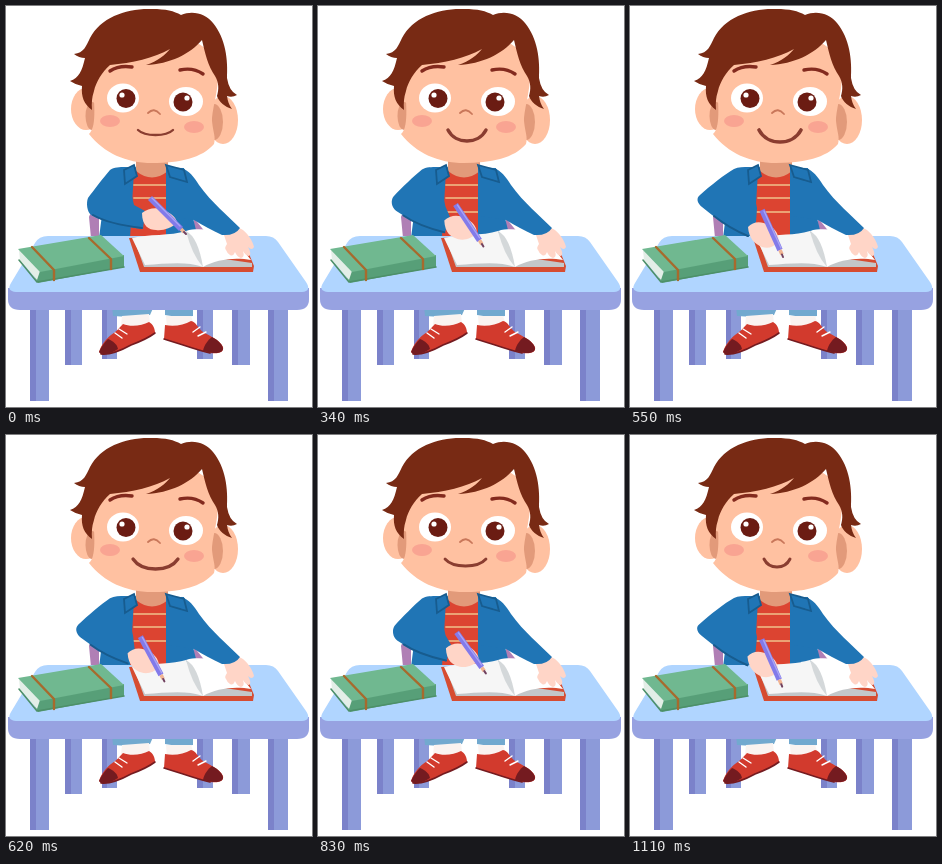
Animation, 306 px wide and 401 px high, one loop 1180 ms. Source, as an HTML page:

```html
<!DOCTYPE html>
<html lang="en">
<head>
<meta charset="utf-8">
<title>Boy writing at a desk</title>
<style>
html, body { margin: 0; width: 100%; height: 100%; overflow: hidden; background: #fff; }
svg { display: block; width: 306px; height: 401px; }
.line { fill: none; stroke-linecap: round; stroke-linejoin: round; }
.flat { fill: none; }
.skin { fill: #ffc1a1; }
.shade { fill: #e29a7a; }
.hand { fill: #ffd5c7; }
.hair { fill: #782a14; }
.blue { fill: #2075b5; }
.seam { stroke: #175c8f; }
.red { fill: #d23a2d; }
.sole { fill: #741b20; }
</style>
</head>
<body>
<svg viewBox="0 0 306 401">
  <!-- back legs of the desk -->
  <path fill="#8c9ad9" d="M59 303h17v56H59zM96 303h15v50H96zM191 303h16v50H191zM226 303h18v56H226z"/>
  <path fill="#7b82ca" d="M59 303h6v56h-6zM96 303h5v50h-5zM191 303h6v50h-6zM226 303h6v56h-6z"/>

  <!-- trousers and shoes -->
  <path fill="#72a9cf" d="M106 300H148L144 309Q128 312 107 310ZM159 300H187V310Q172 312 159 309Z"/>
  <path fill="#faf3f0" d="M116 310L143 308L144 318L128 322L115 319ZM160 310L185 310L188 319L161 322Z"/>
  <path class="red" d="M93 346C95 339 101 332 105 329C110 326 113 322 117 318C124 321 136 320 143 316C147 318 149 323 149 327C143 332 134 335 125 339C116 344 106 349 95 348Z"/>
  <path class="sole" d="M93 346C95 341 99 336 102 333C107 335 111 338 112 343C106 347 100 349 95 348Z"/>
  <path class="red" d="M159 319C168 321 178 319 185 315C190 316 192 322 197 326C204 330 214 334 217 341C218 346 214 348 204 347C190 344 172 337 158 333Z"/>
  <path class="sole" d="M206 331C212 334 217 339 217 343C216 348 208 348 197 345C198 339 202 334 206 331Z"/>
  <path class="line" stroke="#741b20" stroke-width="1.6" d="M95 348C106 349 116 344 125 339Q141 333 149 327M158 333C172 337 190 344 204 347"/>
  <path class="line" stroke="#fff" stroke-width="1.4" d="M109 327l7 5M113 323l8 5M187 326l7-5M192 330l8-4"/>

  <!-- front legs of the desk -->
  <path fill="#8c9ad9" d="M24 302h19v93H24zM262 302h20v93H262z"/>
  <path fill="#7b82ca" d="M24 302h6v93h-6zM262 302h6v93h-6z"/>

  <!-- chair and torso -->
  <path fill="#b07fb5" d="M83 211Q84 206 93 207V232H85ZM188 212L204 232H188Z"/>
  <path class="blue" d="M119 161L178 162L188 216L192 232H93L101 170Z"/>
  <path fill="#dc4431" d="M128 165H160V232H124Z"/>
  <path class="line" stroke="#eba274" stroke-width="1.8" d="M128 179H160M128 192H160M127 206H160"/>
  <path class="shade" d="M130 148H162V165Q146 178 130 165Z"/>

  <!-- desk top -->
  <path fill="#97a2e1" d="M2 282H303V293Q303 304 291 304H14Q2 304 2 293Z"/>
  <path fill="#b0d5ff" d="M42 230H260Q268 230 272 236L300 276Q306 285 296 286H10Q0 285 5 277L29 237Q33 230 42 230Z"/>

  <!-- closed book -->
  <path fill="#579f78" d="M13 244L33 265L118 249V261L32 277Z"/>
  <path fill="#e3eee7" d="M13 244L34 265L31 274L14 254Z"/>
  <path class="line" stroke="#4d9069" stroke-width="1.6" d="M13 254L31 276L118 261"/>
  <path fill="#70b890" d="M12 243L95 229L118 250L34 266Z"/>
  <path class="line" stroke="#a76a2d" stroke-width="2.4" d="M26 241L48 264V274M83 232L105 253V263"/>

  <!-- open book -->
  <path fill="#d64c31" d="M123 232L234 226L248 260L247 266H134Z"/>
  <path fill="#c3c7c9" d="M128 233L197 250L246 257V261H138Z"/>
  <path fill="#f6f6f6" d="M126 232C142 228 165 230 180 225L197 261C180 255 160 258 139 259Z"/>
  <path fill="#fff" d="M180 225C193 221 207 226 220 223L245 254C230 251 210 253 197 261Z"/>
  <path fill="#d4d8da" d="M180 225Q192 231 197 261Q186 249 180 225Z"/>

  <!-- resting arm -->
  <path class="hand" d="M217 226C224 221 231 220 237 224C243 229 247 236 248 241Q246 245 242 241Q246 248 243 250Q240 250 237 245Q239 251 235 252Q231 251 229 246Q227 251 224 249Q221 247 220 244Q218 242 221 238Z"/>
  <path class="blue" d="M160 161L175 162C183 164 188 171 193 179C206 197 222 210 234 222Q229 230 216 229C206 224 198 220 188 214L160 210Z"/>

  <!-- writing arm: its outline runs between two poses -->
  <path class="blue" data-from="M119 161C114 161 108 161 104 164C97 172 88 184 82 192C80 197 81 206 85 209C99 217 119 221 137 223L139 205L128 199Z"
    data-to="M119 161C114 161 108 161 104 163C95 168 80 180 70 189C66 192 67 197 72 201C84 211 100 222 118 231L126 216L127 202Z"/>
  <path class="line seam" stroke-width="2" data-from="M87 209C99 216 119 220 136 222" data-to="M84 210C94 218 106 225 118 230"/>
  <path class="blue seam" stroke-width="1.8" d="M128 159L118 164L119 178L131 170ZM160 159L178 164L181 176L164 171Z"/>
  <path class="hand" data-from="M136 207C142 202 151 201 157 204C165 207 171 212 171 217C165 222 157 225 150 224C143 224 136 220 136 207Z"
    data-to="M118 221C123 215 132 215 138 219C146 222 150 231 148 236C144 241 138 243 132 241C125 238 119 233 118 221Z"/>
  <path class="flat" stroke="#827aea" stroke-width="5.6" data-from="M144 192L175 223" data-to="M132 204L150 244"/>
  <path class="line" stroke="#aaa5f4" stroke-width="1.3" data-from="M146 192L174 220" data-to="M134 205L151 242"/>
  <path class="flat" stroke="#f0b493" stroke-width="3.6" data-from="M175 223L178 226" data-to="M150 244L152 248.5"/>
  <path class="line" stroke="#70405e" stroke-width="2" data-from="M178 226L180 228" data-to="M152 248.5L153 251"/>

  <!-- head -->
  <ellipse class="skin" cx="80" cy="103" rx="15" ry="21"/>
  <ellipse class="skin" cx="217" cy="114" rx="15" ry="24"/>
  <ellipse class="shade" cx="86" cy="110" rx="6.500" ry="14"/>
  <ellipse class="shade" cx="208" cy="116" rx="9" ry="18"/>
  <path class="skin" d="M87 70C98 30 190 8 212 60C214 80 206 102 206 115C207 126 210 131 208 138C196 152 174 157 146 157C120 157 98 147 83 128C92 120 87 92 87 70Z"/>
  <path class="hair" d="M68 48C78 47 80 40 84 32C95 11 121 2 146 3C160 3 168 5 175 9C187 4 200 8 207 17C220 33 222 54 221 72Q223 85 231 89Q226 92 221 90Q222 98 226 103C219 101 213 96 211 90C213 83 213 77 209 70C202 60 199 47 196 34C184 48 164 58 140 59C152 55 159 49 164 43C148 52 126 57 104 59C96 66 90 76 88 85Q85 94 86 104C78 98 75 91 76 80Q70 79 64 75C73 72 76 65 79 52Q73 52 68 48Z"/>
  <path class="line" stroke="#832a1e" stroke-width="3.400" d="M104 65Q113 59 126 61M174 64Q187 61 197 68"/>
  <ellipse fill="#fff" cx="117" cy="92" rx="16" ry="14.500"/>
  <ellipse fill="#fff" cx="180" cy="95.500" rx="17" ry="14.500"/>
  <g fill="#6b1c13">
    <circle cx="120" cy="92.500" r="9.500"/>
    <circle cx="177" cy="96" r="9.500"/>
  </g>
  <circle fill="#fff" cx="116" cy="89" r="2.600"/>
  <circle fill="#fff" cx="181" cy="92" r="2.600"/>
  <ellipse fill="#f9a492" cx="104" cy="115" rx="10" ry="6"/>
  <ellipse fill="#f9a492" cx="188" cy="121" rx="10" ry="6"/>
  <path class="line" stroke="#c9775a" stroke-width="1.8" d="M142 107Q148 101 154 108"/>
  <path id="mouth" class="line" stroke="#8a3d30"/>
</svg>
<script>
const LOOP = 1180, HOLD = 270, STEP = 70;
// One value per step: how far the hand has come down, and the smile.
const reach = [0, .3, .54, .75, .9, 1, .8, .55, .46, .45, .66, .84, .97, 1.03];
const smile = {
  left:  [132, 131, 130, 130, 129, 129, 127, 126, 126, 127, 129, 131, 132, 134],
  right: [167, 168, 168, 168, 169, 171, 172, 172, 170, 168, 166, 164, 162, 160],
  low:   [129, 132, 135, 138, 137, 136, 134, 132, 131, 131, 131, 131, 132, 132]
};
const number = /\d+(\.\d+)?/g;
const moving = document.querySelectorAll("[data-from]");
const mouth = document.getElementById("mouth");

function mix(from, to, k) {
  const ends = to.match(number);
  let i = 0;
  return from.replace(number, n => (+n + (ends[i++] - n) * k).toFixed(2));
}

function draw() {
  const t = performance.now() % LOOP;
  const step = t < HOLD ? 0 : 1 + Math.floor((t - HOLD) / STEP);
  for (const part of moving)
    part.setAttribute("d", mix(part.dataset.from, part.dataset.to, reach[step]));

  const [left, right, low] = [smile.left, smile.right, smile.low].map(v => v[step]);
  const bend = (right - left) / 5, pull = (4 * low - 124) / 3;
  mouth.setAttribute("d", `M${left} 124C${left + bend} ${pull} ${right - bend} ${pull} ${right} 124`);
  mouth.setAttribute("stroke-width", 2.4 + (low - 129) * .18);
  requestAnimationFrame(draw);
}
draw();
</script>
</body>
</html>
```
